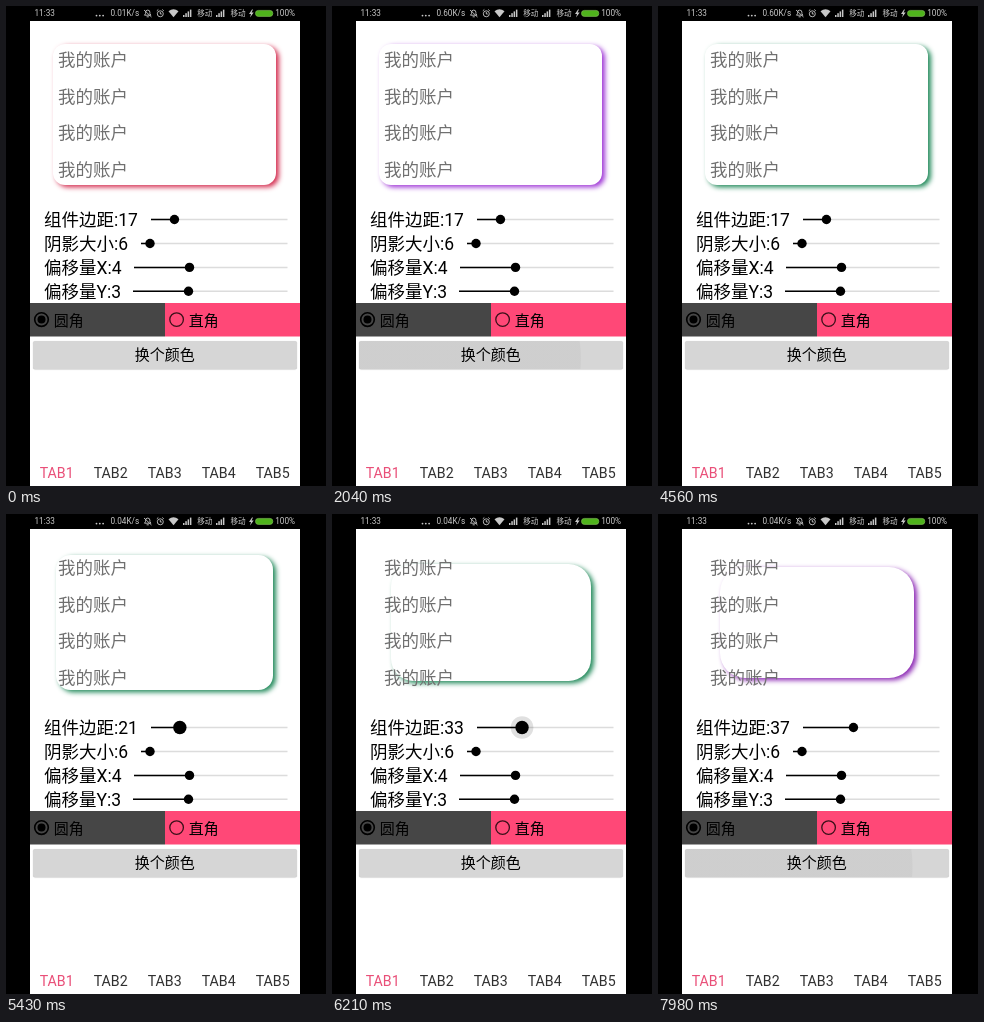
Recreate the animation shown at these times as an HTML page. Size 320 by 480 pixels, loop 8000 ms.

```html
<!DOCTYPE html>
<html lang="zh-CN">
<head>
<meta charset="utf-8">
<style>
html, body { margin: 0; width: 100%; height: 100%; overflow: hidden; background: #000; }
#stage { position: relative; width: 320px; height: 480px; overflow: hidden; background: #000; }
#stage > * { position: absolute; }
#page { left: 24px; top: 15px; width: 270px; height: 465px; background: #fff; }
#card { background: #fff; }
#button { left: 27px; top: 335px; width: 264px; height: 28px; border-radius: 2px; background-color: #d6d6d6; }
svg { left: 0; top: 0; }
text { font-family: Roboto, "Noto Sans CJK SC", "Noto Sans CJK", sans-serif; white-space: pre; }
.status { font-size: 8.2px; fill: #c8c8c8; }
.line { fill: none; stroke: #c8c8c8; stroke-width: .9; }
.item { font-size: 17.5px; fill: #707070; }
.label { font-size: 17.5px; }
.small { font-size: 15px; }
.tab { font-size: 14.2px; fill: #303030; text-anchor: middle; }
</style>
</head>
<body>
<div id="stage">
  <div id="page"></div>
  <div id="card"></div>
  <div id="button"></div>
  <svg width="320" height="480" viewBox="0 0 320 480">
    <g class="status">
      <text x="28.5" y="10.4">11:33</text>
      <g><circle cx="90.5" cy="9.6" r=".9"/><circle cx="93.8" cy="9.6" r=".9"/><circle cx="97.1" cy="9.6" r=".9"/></g>
      <text id="speed" x="104.5" y="10.4"></text>
      <g class="line">
        <path d="M138.5 9.2h6.4l-1-1.5v-1.4a2.2 2.2 0 0 0-4.4 0v1.4zM138 4l7.5 7M140.6 10.8h2.2"/>
        <circle cx="154.3" cy="7.8" r="3"/>
        <path d="M154.3 6v2h1.5M150.8 4.8l1.5-1.3M157.8 4.8l-1.5-1.3"/>
      </g>
      <path d="M162.5 5.2q5-4 10 0l-5 6z"/>
      <g id="signals"></g>
      <text x="191.2" y="10.4" font-size="7.6">移动</text>
      <text x="224.4" y="10.4" font-size="7.6">移动</text>
      <path d="M246 3.5l-3 4.5h2l-1 3.5 3.7-5h-2.2l1.5-3z"/>
      <rect x="249.5" y="4.4" width="17.3" height="6" rx="2.8" fill="#4fb31c" stroke="#86c45c" stroke-width=".6"/>
      <text x="269.2" y="10.4">100%</text>
    </g>
    <g id="items"></g>
    <g id="sliders"></g>
    <path fill="#464646" d="M24 297h135v33.5H24z"/>
    <path fill="#ff4877" d="M159 297h135v33.5H159z"/>
    <g fill="none" stroke="#000">
      <circle cx="35.5" cy="313.6" r="6.8" stroke-width="1.6"/>
      <circle cx="170.6" cy="313.6" r="6.8" stroke="#3a1019" stroke-width="1.3"/>
    </g>
    <circle cx="35.5" cy="313.6" r="4"/>
    <text class="small" x="47.8" y="319.6">圆角</text>
    <text class="small" x="182.8" y="319.6">直角</text>
    <text class="small" x="128.8" y="354.2">换个颜色</text>
    <g id="tabs"></g>
  </svg>
</div>
<script>
const LOOP = 8000;
const START_COLOR = '#d43052';
const PRESSES = [
  { at: 1680, hold: 180, color: '#9f36d6' },
  { at: 2820, hold: 130, color: '#4fc09b' },
  { at: 3510, hold: 220, color: '#228a5b' },
  { at: 7530, hold: 180, color: '#8c28b4' }
];
const MARGIN = [[5250, 17], [5790, 28], [5980, 30], [6580, 37]];
const $ = id => document.getElementById(id);
const ramp = (t, a, b) => Math.min(1, Math.max(0, (t - a) / (b - a)));

function along(points, t) {
  let v = points[0][1];
  for (let i = 1; i < points.length; i++) {
    const [a, from] = points[i - 1], [b, to] = points[i];
    v += (to - from) * ramp(t, a, b);
  }
  return v;
}

const slider = (y, label, left, thumb, main = false) => `
  <text class="label" x="38" y="${y + 6.9}"${main ? ' id="marginLabel"' : ''}>${label}</text>
  <path d="M${left} ${y}H281.5" stroke="#dcdcdc" stroke-width="1.5"/>
  ${main ? `<circle id="halo" cy="${y}"/>` : ''}
  <path${main ? ' id="marginBar"' : ''} d="M${left} ${y}H${thumb}" stroke="#000" stroke-width="1.5"/>
  <circle${main ? ' id="marginThumb"' : ''} cx="${thumb}" cy="${y}" r="4.7"/>`;

$('signals').innerHTML = [177, 210].map(x =>
  [0, 1, 2, 3].map(i => `<rect x="${x + i * 2.3}" y="${9 - i * 1.8}" width="1.5" height="${2 + i * 1.8}"/>`).join('')).join('');
$('items').innerHTML = [0, 1, 2, 3].map(i =>
  `<text class="item" x="52" y="${60.2 + i * 36.5}">我的账户</text>`).join('');
$('sliders').innerHTML =
  slider(213.5, '组件边距:17', 145, 168.5, true) +
  slider(237.5, '阴影大小:6', 135, 144) +
  slider(261.4, '偏移量X:4', 128, 183.5) +
  slider(285.3, '偏移量Y:3', 127, 182.5);
$('tabs').innerHTML = [1, 2, 3, 4, 5].map(n =>
  `<text class="tab" x="${n * 54 - 3.3}" y="471.6"${n === 1 ? ' style="fill:#e94f78"' : ''}>TAB${n}</text>`).join('');

function drawCard(m, color) {
  const d = (m - 17) * 0.73, s = $('card').style;
  s.left = 47 + d + 'px';
  s.top = 38 + d + 'px';
  s.width = 223.2 - 2 * d + 'px';
  s.height = 140.5 - 2 * d + 'px';
  s.borderRadius = 12 + (m - 17) * 0.65 + 'px';
  s.boxShadow = `3px 2.25px 5.5px ${color}`;
}

function drawMargin(t, m) {
  const x = 145.5 + 1.35 * m;
  $('marginLabel').textContent = '组件边距:' + m;
  $('marginBar').setAttribute('d', `M145 213.5H${x}`);
  $('marginThumb').setAttribute('cx', x);
  $('marginThumb').setAttribute('r', 4.7 + 2 * (ramp(t, 5190, 5340) - ramp(t, 6720, 6990)));
  $('halo').setAttribute('cx', x);
  $('halo').setAttribute('r', 6 + 6 * ramp(t, 5500, 6300));
  $('halo').setAttribute('opacity', 0.12 * ramp(t, 5400, 6100) * (1 - ramp(t, 6650, 6780)));
}

function drawButton(t) {
  let lift = 0, alpha = 0, radius = 0;
  for (const { at, hold } of PRESSES) {
    const age = t - at;
    if (age < 0 || age > 700) continue;
    lift = ramp(age, 0, 100) - ramp(age, hold, hold + 120);
    alpha = 0.035 * ramp(age, 40, 250) * (1 - ramp(age, 450, 680));
    radius = 20 + 112 * ramp(age, 0, 380);
  }
  const s = $('button').style, ink = `rgba(0,0,0,${alpha})`;
  s.boxShadow = `0 ${0.5 + 1.5 * lift}px ${1 + 2.5 * lift}px rgba(0,0,0,${0.25 + 0.15 * lift})`;
  s.backgroundImage = `radial-gradient(circle at 95px 18px, ${ink} ${radius}px, transparent ${radius + 1}px)`;
}

function draw(t) {
  const m = Math.round(along(MARGIN, t));
  const color = PRESSES.reduce((c, p) => t >= p.at + p.hold ? p.color : c, START_COLOR);
  $('speed').textContent = (t < 30 ? '0.01' : t < 5400 ? '0.60' : '0.04') + 'K/s';
  drawCard(m, color);
  drawMargin(t, m);
  drawButton(t);
}

const begin = performance.now();
function tick() {
  draw((performance.now() - begin) % LOOP);
  requestAnimationFrame(tick);
}
tick();
</script>
</body>
</html>
```
